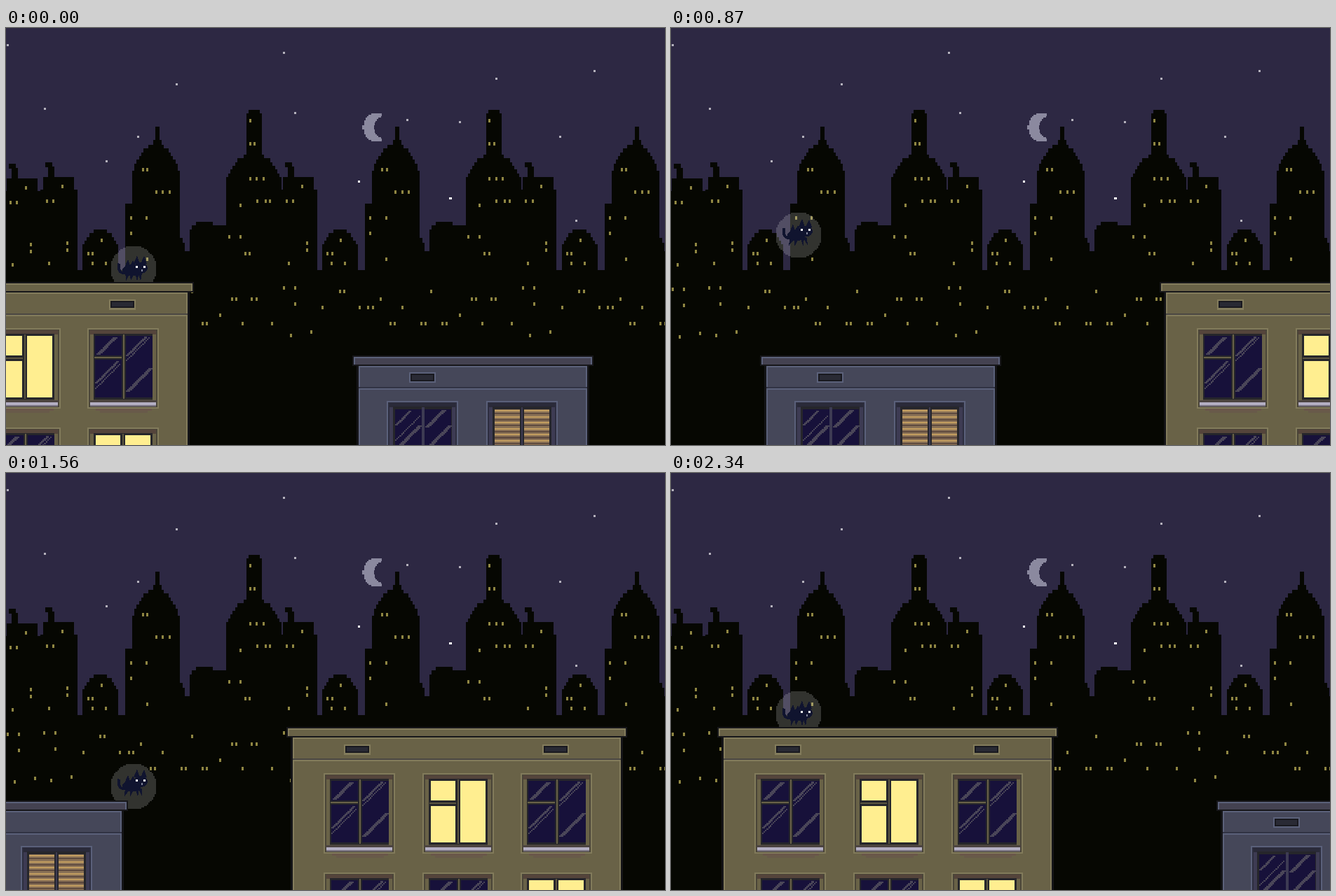
An HTML page that plays this animation: 940x596 px, repeating every 2.37 s.

```html
<!DOCTYPE html>
<html lang="en">
<head>
<meta charset="utf-8">
<title>Rooftop run</title>
<style>
html, body { margin: 0; width: 100%; height: 100%; overflow: hidden; background: #060702; }
svg { display: block; width: 940px; height: 596px; }
</style>
</head>
<body>
<svg id="stage" viewBox="0 0 940 596" shape-rendering="crispEdges"></svg>
<script>
const LOOP = 2370, STEP = 30, SPAN = 1282;
const U = 2.136, TILE = 160 * U;      // art pixel and skyline period
const COL = 1.5 * U, ROW = 2.5 * U;   // skyline pixel
const NIGHT = '#060702';

const range = n => [...Array(n).keys()];
const rect = (x, y, w, h, fill) => `<rect x="${x}" y="${y}" width="${w}" height="${h}" fill="${fill}"/>`;
const path = (d, fill) => `<path d="${d}" fill="${fill}"/>`;
const box = (x, y, w, h) => `M${x} ${y}h${w}v${h}h${-w}z`;
const use = (id, x, y) => `<use href="#${id}" x="${x}" y="${y}"/>`;

let seed = 11;
const random = () => (seed = seed * 16807 % 2147483647) / 2147483647;

// Skyline
const slab = (x, y, w, h = 400) => rect(x, y, w, h, NIGHT);
function dome(x, w, top, drop) {
  const n = Math.round(w / COL), step = w / n;
  return path(range(n).map(i => {
    const d = Math.abs((i + 0.5) * 2 / n - 1) ** 2.5 * drop;
    return box(x + i * step, top + Math.round(d / ROW) * ROW, step + 0.1, 400);
  }).join(''), NIGHT);
}
const lamps = (x, y, n = 1, gap = 3) =>
  path(range(n).map(i => box(x - 1.5 + i * gap * COL, y - 2.5, 3, 5)).join(''), '#8f8642');

const block =
  dome(109, 51, 288, 24) + lamps(117, 322, 2, 2) + lamps(136, 303) + lamps(123, 336, 2, 6) +
  slab(170, 251, 10) + dome(180, 68, 167, 40) + slab(213, 141, 6) + slab(210, 160, 12) +
  slab(248, 300, 4) + slab(251, 307, 4) + slab(254, 319, 8) +
  lamps(195, 202, 2, 2) + lamps(214, 234, 3) + lamps(178, 271, 2, 7) + lamps(178, 293) + lamps(201, 330) +
  slab(262, 288, 52) + slab(265, 282, 49) + slab(271, 277, 24) +
  dome(314, 79, 181, 34) + slab(343, 122, 22) + slab(346, 117, 16) +
  lamps(348, 132) + lamps(348, 165, 2, 2) + lamps(348, 215, 3) + lamps(334, 253) + lamps(358, 247) + lamps(370, 247, 2, 2) +
  lamps(318, 298, 2, 5) + lamps(341, 322, 2, 2) +
  range(15).map(i => lamps(110 + (i + random()) * 18.5, 376 + Math.floor(random() * 6) * 11.5, 1 + i % 2, 2)).join('');

const house =
  slab(391, 231, 52.5) + slab(395, 213, 44) + slab(398, 192, 10, 7) + slab(402, 198, 9) +
  lamps(422, 226) + lamps(400, 247, 2) + lamps(429, 307) + lamps(429, 317) + lamps(403, 336) +
  lamps(396, 371, 2, 5) + lamps(412, 394) + lamps(406, 439) + lamps(435, 434);

const stars = '2,24 396,35 243,80 55,115 412,121 188,155 143,190 699,72 839,61 572,131 647,134 790,155 813,275'
  .split(' ').map(p => p.split(','))
  .map(([x, y]) => rect(x - 1.5, y - 1.5, 3, 3, '#b5b2bd')).join('') +
  rect(502, 218, 3, 3, '#fff') + rect(632, 242, 4, 3, '#fff');

// Discs drawn in rows of art pixels
const half = (r, d) => Math.sqrt(Math.max(0, r * r - d * d));
const moon = path(range(19).map(i => {
  const d = (i - 9) * U, left = Math.round((530 - half(21, d)) / U) * U;
  return box(left, 142.1 + d - U / 2, Math.min(536, 541 - half(16, d)) - left, U + 0.1);
}).join(''), '#8b899f');
const bubble = path(range(30).map(i => {
  const h = Math.round(half(15.2, i - 14.5)) * U;
  return box(-h, (i - 15) * U, 2 * h, U);
}).join(''), 'rgba(255,255,255,.175)');

// Stepped reflection rising to the right
const glint = (x, y, n, w) => path(range(n).map(i => box(x + i * U, y - i * U, w * U, U + 0.1)).join(''), '#4a4658');

// Windows
const GLASS = '#17113a', FRAME = '#26262b', LIT = '#ffee90', OLIVE = '#696247', JAMB = '#3d3b53';
const frame = (edge, inner, top, jamb) =>
  rect(0, 0, 102, 115, edge) + rect(U, U, 97.7, 110.7, inner) + rect(4, 3, 94, 6, top) +
  rect(4, 9, 5, 95, jamb) + rect(93, 9, 5, 95, jamb) + rect(9, 8, 84, 94, FRAME);
const sill = rect(3, 103, 96, 3, '#4c4441') + rect(4, 106, 94, 4, '#b4afc3') + rect(4, 110, 94, 2, '#77717f') +
  rect(12, 115, 80, 3, '#6a574a') + rect(18, 118, 68, 3, '#685a4a');
const olive = frame('#827b5b', '#4a4538', '#54443b', OLIVE);
const dark = olive + rect(11, 11, 82, 88, GLASS) +
  rect(49, 9, 6, 92, FRAME) + rect(51, 9, U, 92, OLIVE) +
  rect(10, 39, 39, 6, FRAME) + rect(10, 41, 39, U, OLIVE) +
  glint(13, 36, 12, 3) + glint(11, 77, 15, 2) + glint(11, 85, 17, 1) +
  glint(55, 38, 13, 2) + glint(55, 45, 16, 1) + glint(55, 89, 16, 3) + sill;
const lit = olive + rect(12, 11, 35, 28, LIT) + rect(12, 47, 35, 52, LIT) + rect(54, 11, 36, 88, LIT) +
  rect(49.5, 9, U, 92, '#5b553f') + rect(10, 41.5, 38, U, '#5b553f') + sill;
const slate = frame('#5a607a', '#2d2e3f', '#2a2a39', JAMB);
const pair = slate + rect(12, 12, 38, 88, GLASS) + rect(54, 12, 38, 88, GLASS) + rect(50, 9, 4, 92, JAMB) +
  glint(12, 33, 10, 2) + glint(12, 55, 17, 1) + glint(16, 63, 14, 3) + glint(55, 36, 12, 3) + glint(55, 67, 16, 3);
const blind = x => rect(x, 12, 36, 88, '#8b7256') + range(10).map(i =>
  rect(x, 13 + i * 4 * U, 36, U, '#c39e60') + rect(x, 13 + (i * 4 + 2) * U, 36, U, '#5f4b40')).join('');
const blinds = slate + blind(12) + blind(54) + rect(50, 9, U, 92, JAMB);

// Buildings
function facade(w, y, fill, light, shade, roof) {
  const layer = (inset, row, rows, color) => rect(inset * U, y + row * U, w - 2 * inset * U, rows * U, color);
  return layer(3, 6, 120, '#141417') + layer(4, 7, 120, light) + layer(5, 8, 120, fill) +
    layer(4, 21, 1, shade) + layer(4, 22, 1, light) +
    layer(0, 0, 7, '#17171a') + layer(1, 1, 5, light) + layer(2, 2, 4, roof);
}
const vent = (x, y, light) => rect(x, y, 18 * U, 7 * U, light) + rect(x + U, y + U, 16 * U, 5 * U, '#19191f') +
  rect(x + 2 * U, y + 2 * U, 14 * U, 3 * U, '#292a34');
const tall = facade(486, 170 * U, OLIVE, '#837c5c', '#4b4843', OLIVE) +
  vent(82, 387.6, '#837c5c') + vent(365, 387.6, '#837c5c') +
  range(6).map(i => {
    const col = i % 3, row = Math.floor(i / 3);
    return use(col === row + 1 ? 'lit' : 'dark', 53 + Math.round(col * 140.5), 429 + row * 142);
  }).join('');
const low = facade(344, 219 * U, '#454759', '#5b617a', '#313344', '#444251') +
  vent(81, 492, '#5b617a') + use('pair', 49, 533) + use('blinds', 191, 533);

// Cat: eye height sets the head, reach spreads the legs
function cat(eye, reach) {
  const back = eye / 2 + 4, foot = Math.min(18, back + 15);
  const leg = (x, dx) => `M${x - 3} ${back}L${x + dx} ${foot}L${x + 4} ${back + 4}z`;
  const spike = (x, y, h) => `M${x - 4} ${y}L${x + 1} ${y - h}L${x + 5} ${y}z`;
  const body = leg(-9, -reach) + leg(-3, -reach / 2) + leg(4, reach / 2) + leg(8, reach) +
    spike(-9, back - 4, 12) + spike(-2, back - 6, 8) + spike(4, eye - 4, 12) + spike(14, eye - 4, 11);
  return path(body, '#10142f') +
    `<g fill="#10142f"><ellipse cx="-3" cy="${back}" rx="13" ry="8"/><ellipse cx="10" cy="${eye + 2}" rx="10" ry="8"/></g>` +
    `<path d="M-11 ${back + 3}q-12 3 -10 -13" fill="none" stroke="#10142f" stroke-width="4"/>` +
    rect(3, eye - 1.5, 3, 3, '#fff') + rect(13.5, eye - 1.5, 3, 3, '#fff') + rect(11, eye + 3.5, U, 3, '#7f8296');
}
const poses = { mid: cat(-3, 2), high: cat(-9, 4), crouch: cat(2, 7), jump: cat(-7.5, 5) };

const named = parts => Object.entries(parts).map(([id, s]) => `<g id="${id}">${s}</g>`).join('');
const stage = document.getElementById('stage');
stage.innerHTML = `<defs>${named({ dark, lit, pair, blinds, block, house, tall, low })}</defs>` +
  rect(0, 0, 940, 596, '#2d2843') + stars + moon + rect(0, 346, 940, 250, NIGHT) +
  range(3).map(k => use('block', k * TILE, 0) + use('house', (k - 1) * TILE, 0)).join('') +
  use('house', -TILE - 52, 2) +
  `<g id="hero">${bubble}${named(poses)}</g><g id="street">` +
  use('tall', 0, 0) + use('tall', -SPAN, 0) + use('low', -570, 0) + use('low', SPAN - 570, 0) + '</g>';

const hero = document.getElementById('hero'), street = document.getElementById('street');
const catParts = Object.keys(poses).map(id => document.getElementById(id));

const scroll = [[0, 1064], [600, 810], [1110, 596], [1350, 489], [1740, 324], [2130, 164], [2370, 52]];
function streetX(t) {
  const i = scroll.findIndex(([end]) => t < end);
  const [t0, x0] = scroll[i - 1], [t1, x1] = scroll[i];
  return Math.round(x0 + (x1 - x0) * (t - t0) / (t1 - t0));
}

const HIGH_ROOF = 344, LOW_ROOF = 448, RISE = 346, LEAP = 157;
const arc = (t, apex, top) => top + LEAP * ((t - apex) / RISE) ** 2;
const run = t => ['mid', 'high', 'mid', 'crouch'][Math.floor(t / 100) % 4];
function catAt(t) {
  if (t < 236) return [HIGH_ROOF, run(t + 80)];
  if (t < 1028) return [arc(t, 582, 187), 'jump'];
  if (t < 1577) return [LOW_ROOF, run(t - 1028)];
  if (t < 2140) return [arc(t, 1923, 290), 'jump'];
  return [HIGH_ROOF, run(t - 2140)];
}

function draw() {
  const t = Math.floor(performance.now() % LOOP / STEP) * STEP;
  const [y, pose] = catAt(t);
  street.setAttribute('transform', `translate(${streetX(t)} 0)`);
  hero.setAttribute('transform', `translate(182 ${Math.round(y)})`);
  for (const part of catParts) part.style.display = part.id === pose ? '' : 'none';
  requestAnimationFrame(draw);
}
draw();
</script>
</body>
</html>
```
